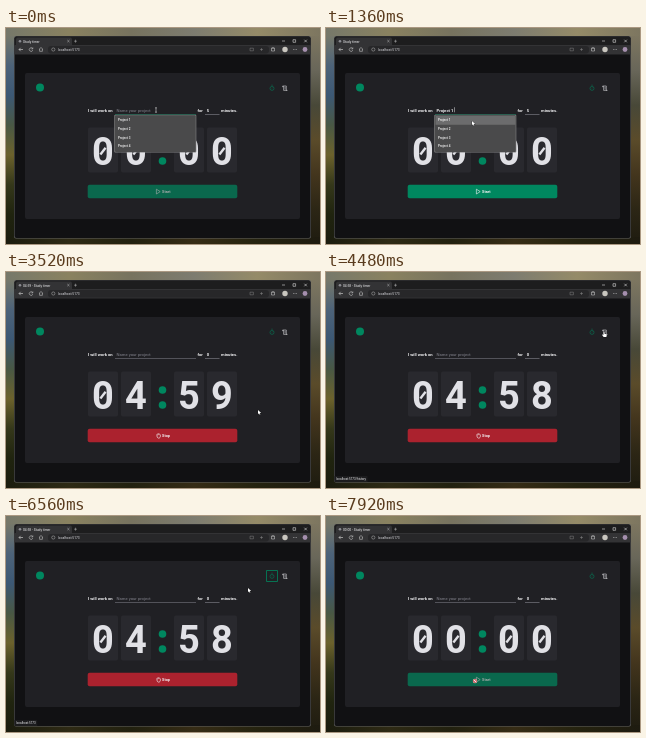
Write an HTML page with a canvas that moves like this. It is 314 px wide and 216 px high and loops after 8000 ms.

```html
<!DOCTYPE html>
<html lang="en">
<head>
<meta charset="utf-8">
<title>Study timer</title>
<style>
  html, body { margin: 0; width: 100%; height: 100%; overflow: hidden; background: #111; }
  canvas { display: block; width: 314px; height: 216px; }
</style>
</head>
<body>
<canvas id="stage"></canvas>
<script>
const W = 314, H = 216, LOOP = 8000;
const canvas = document.getElementById('stage');
const ratio = window.devicePixelRatio || 1;
canvas.width = W * ratio;
canvas.height = H * ratio;
const c = canvas.getContext('2d');
c.scale(ratio, ratio);

const C = {
  page: '#111113', card: '#202024', box: '#29292e', head: '#323238',
  grey: '#85858f', soft: '#d4d4da', text: '#e1e1e6', bright: '#f4f4f6',
  green: '#00875f', greenHover: '#015f43', greenOff: '#0a684d',
  red: '#ab222e', redHover: '#7a1921'
};

// Moments of the interaction, in ms
const T = { pick: 1040, close: 1520, start: 1960, tick: 3040, tick2: 4040,
            history: 4640, back: 6160, tick3: 7200, stop: 7440 };

// Pointer stops: time, x, y
const PATH = [
  [0, 150, 82], [480, 150, 82], [1000, 146, 93], [1520, 146, 93],
  [1880, 169, 166], [2640, 169, 166], [2720, 168.5, 166], [3040, 168.5, 166],
  [3440, 252, 138], [3760, 252, 138], [4400, 278, 60], [5600, 278, 60],
  [6000, 266, 60], [6240, 266, 60], [6560, 242, 72], [6680, 240, 76],
  [7200, 149, 164], [8000, 149, 164]
];

function rect(x, y, w, h, fill, r = 0) {
  c.fillStyle = fill;
  c.beginPath();
  c.roundRect(x, y, w, h, r);
  c.fill();
}
function circle(x, y, r, fill) {
  c.fillStyle = fill;
  c.beginPath();
  c.arc(x, y, r, 0, 7);
  c.fill();
}
function stroke(d, color, width = 0.6) {
  c.strokeStyle = color;
  c.lineWidth = width;
  c.stroke(new Path2D(d));
}
function text(s, x, y, size, color, weight = 400, align = 'left') {
  c.font = `${weight} ${size}px Roboto, sans-serif`;
  c.textAlign = align;
  c.fillStyle = color;
  c.fillText(s, x, y);
}
function gradient(x0, y0, x1, y1, colors) {
  const g = c.createLinearGradient(x0, y0, x1, y1);
  colors.forEach((color, i) => g.addColorStop(i / (colors.length - 1), color));
  return g;
}

function pointerAt(t) {
  const i = Math.max(1, PATH.findIndex(p => p[0] > t));
  const [t0, x0, y0] = PATH[i - 1], [t1, x1, y1] = PATH[i];
  const k = (t - t0) / (t1 - t0), e = k * k * (3 - 2 * k);
  return [x0 + (x1 - x0) * e, y0 + (y1 - y0) * e];
}
function clockAt(t) {
  if (t < T.start || t >= T.stop) return '0000';
  if (t < T.tick) return '0500';
  if (t < T.tick2) return '0459';
  return t < T.tick3 ? '0458' : '0455';
}

function drawWallpaper() {
  rect(0, 0, W, 10, gradient(0, 0, W, 0,
    ['#76786a', '#8a8260', '#77735f', '#7d7c70', '#958b68', '#7d7660']));
  rect(0, 8, 10, H, gradient(0, 8, 0, H,
    ['#76786a', '#4d6379', '#3c5874', '#495844', '#6c622c', '#35381a', '#20240f', '#1b1c0e']));
  rect(303, 8, 11, H, gradient(0, 8, 0, H,
    ['#7d7660', '#686659', '#484838', '#5a4b2a', '#43351d', '#2c2615', '#1e1b10']));
  rect(0, 209, W, 7, gradient(0, 0, W, 0,
    ['#1b1c0e', '#2e2a14', '#22210f', '#362c15', '#25230f', '#1e1b10']));
}

function drawBrowser(title, path) {
  rect(8, 8, 297, 202.5, '#626262', 2);
  rect(8.5, 8.5, 296, 201.5, C.page, 2);
  rect(8.5, 8.5, 296, 9, '#1d1d1e', [2, 2, 0, 0]);
  rect(10, 9.5, 56, 8, '#333335', [2, 2, 0, 0]);
  rect(8.5, 17, 296, 9.5, '#333335');
  rect(42, 18, 221, 7.4, '#272729', 3);

  circle(14, 13.3, 1.3, '#8c8c92');
  text(title, 17, 14.5, 3.3, C.bright);
  const ink = '#d8d8d8';
  stroke('M61.3 12l2.2 2.2m0-2.2l-2.2 2.2M68 13.2h3m-1.5-1.5v3', ink, 0.4);
  stroke('M276 13h3M287 11.7h2.6v2.6H287zM298.3 11.7l2.6 2.6m0-2.6l-2.6 2.6', ink, 0.6);
  stroke('M17 21.5h-4m1.7-1.7l-1.7 1.7 1.7 1.7', ink);
  stroke('M26.6 20.6a1.8 1.8 0 1 0 .2 1.5M26.8 19.4v1.5h-1.5', ink, 0.5);
  stroke('M33 21.4l2-1.9 2 1.9M33.6 21v2.3h2.8V21', ink, 0.5);
  stroke('M45.7 21.5a1.6 1.6 0 1 0 3.2 0a1.6 1.6 0 1 0-3.2 0', ink, 0.4);
  text('localhost:5173' + path, 52, 22.8, 3.3, C.text);
  stroke('M244 20.2h3.4v2.6H244zM254 21.5h3m-1.5-1.5v3', '#9a9a9a', 0.4);
  stroke('M265.5 20h3v3h-3zM267 19v2', ink, 0.5);
  circle(279, 21.5, 2.7, '#c9c6bf');
  [287.5, 289, 290.5].forEach(x => circle(x, 21.5, 0.4, ink));
  circle(299, 21.5, 2.4, '#a58fae');
}

function drawHeader(t, onHistory) {
  rect(19, 45, 275, 146, C.card, 2);
  circle(34, 59.5, 4, C.green);
  const timer = onHistory ? C.text : C.green, list = onHistory ? C.green : C.text;
  stroke('M264 60.4a2 2 0 1 0 4 0a2 2 0 1 0-4 0M266 60.4l.8-.8M265.3 57.2h1.4', timer, 0.5);
  stroke('M276.6 58h3.7v4.4h1.2M276.6 58v1.2M277.6 58v4.4h3.3M278.5 59.7h1.2m-1.2 1.2h1.2', list, 0.55);
  if (onHistory) stroke('M284.5 54v12h-11', C.green, 0.9);
  else if (t >= T.back && t < T.stop) stroke('M260.5 54.5h11v11h-11z', C.green, 0.8);
}

function drawForm(t) {
  const focused = t < T.close, filled = t >= T.pick && t < T.start;
  text('I will work on', 82, 83.5, 4.2, C.bright, 700);
  text(filled ? 'Project 1' : 'Name your project', 110.5, 83.5, 4.2, filled ? C.bright : C.grey, filled ? 700 : 400);
  if (filled && focused) rect(128.3, 79.3, 0.5, 5, C.text);
  rect(109, 86, 81, 0.6, focused ? C.green : C.grey);
  text('for', 191.5, 83.5, 4.2, C.bright, 700);
  text(t < T.start ? '5' : '0', 202, 83.5, 4.2, C.bright, 700, 'center');
  rect(199, 86, 14.5, 0.6, C.grey);
  text('minutes.', 215, 83.5, 4.2, C.bright, 700);
}

function drawClock(digits) {
  [97, 130, 183, 216].forEach((x, i) => {
    rect(x - 15, 99.5, 30, 45, C.box, 2);
    text(digits[i], x, 136.5, 38, C.text, 700, 'center');
    if (digits[i] === '0') stroke(`M${x - 2.6} 126.4L${x + 2.6} 119.8`, C.text, 2.4);
  });
  circle(156.5, 118, 3.8, C.green);
  circle(156.5, 133, 3.8, C.green);
}

function drawButton(t, hover) {
  const running = t >= T.start && t < T.stop;
  const enabled = t >= T.pick && t < T.start;
  const fill = running ? (hover ? C.redHover : C.red)
    : enabled ? (hover ? C.greenHover : C.green) : C.greenOff;
  const ink = running || enabled ? C.bright : '#a6aaaa';
  rect(81.7, 156.7, 149.6, 13.5, fill, 2);
  if (running) stroke('M151 164v-1.9m1.1 1v-2m1.1 2v-1.6m-2.2 2.4c0 3 3.4 3 3.4 0v-1.3', ink, 0.65);
  else stroke('M150.4 161.2v4.8l3.8-2.4z', ink, 0.6);
  text(running ? 'Stop' : 'Start', 156, 165.1, 3.9, ink, 700);
}

function drawSuggestions(t) {
  rect(108.3, 86.7, 82, 37.8, '#808081', 1);
  rect(109, 87.3, 80.7, 36.6, '#4a4a4b', 1);
  if (t >= T.pick) rect(109.5, 88, 80, 8.7, '#6c6c6d');
  for (let i = 0; i < 4; i++) text('Project ' + (i + 1), 112, 93.2 + i * 8.65, 3.1, '#fff', 500);
}

function drawHistory() {
  text('My history', 41.8, 83.8, 5.6, C.bright, 700);
  rect(42, 92.5, 229, 13, C.head, [2, 2, 0, 0]);
  rect(42, 106.3, 229, 12.7, C.box);
  const columns = [47, 160, 188, 238];
  ['Task', 'Duration', 'Begin', 'Status'].forEach((s, i) => text(s, columns[i], 100.3, 3.5, C.bright, 700));
  ['Project 1', '5 minutes', 'less than a minute ago'].forEach((s, i) => text(s, columns[i], 114, 3.25, C.soft, 500));
  circle(239, 113, 1, '#fba94c');
  text('In progress', 242, 114, 3.25, C.soft, 500);
}

function drawStatus(s) {
  c.font = '400 3px Roboto, sans-serif';
  rect(8.5, 204, c.measureText(s).width + 3, 6, '#1c1c1e', [0, 1, 0, 0]);
  text(s, 10, 208, 3, C.bright);
}

function drawPointer(x, y, kind) {
  c.save();
  c.translate(x, y);
  if (kind === 'text') {
    stroke('M-1-2.2h2M0-2.2v4.4M-1 2.2h2', '#eeeeee', 0.5);
  } else if (kind === 'blocked') {
    circle(0, 1, 2.2, '#eeeeee');
    stroke('M-1.7 1a1.7 1.7 0 1 0 3.4 0a1.7 1.7 0 1 0-3.4 0M-1.2 2.2L1.2-.2', '#c43c40', 0.7);
  } else {
    const shape = new Path2D(kind === 'hand'
      ? 'M-.5 0q.5-.6 1 0v1.7l1.8.5q.6.2.5.8l-.4 2H-.4L-1.9 3q0-.8.8-.4l.6.4z'
      : 'M0 0v4.2l1-.9.7 1.5.7-.3-.6-1.5h1.4z');
    c.strokeStyle = '#111';
    c.lineWidth = 0.5;
    c.fillStyle = '#fff';
    c.stroke(shape);
    c.fill(shape);
  }
  c.restore();
}

function draw(t) {
  const onHistory = t >= T.history && t < T.back;
  const digits = clockAt(t);
  const [x, y] = pointerAt(t);
  const overButton = !onHistory && x > 82 && x < 231 && y > 157 && y < 170;
  const overTimer = x > 260 && x < 272 && y > 54 && y < 66;
  const overList = x > 273 && x < 285 && y > 54 && y < 66;
  const overField = x > 109 && x < 190 && y > 78 && y < 87;

  drawWallpaper();
  drawBrowser(t < T.tick ? 'Study timer' : `${digits.slice(0, 2)}:${digits.slice(2)} - Study timer`,
    onHistory ? '/history' : '');
  drawHeader(t, onHistory);
  if (onHistory) {
    drawHistory();
  } else {
    drawForm(t);
    drawClock(digits);
    drawButton(t, overButton);
    if (t < T.close) drawSuggestions(t);
  }
  if (overList) drawStatus('localhost:5173/history');
  else if (overTimer || (t > T.back && t < 6720)) drawStatus('localhost:5173');

  let kind = 'arrow';
  if (overButton) kind = t >= T.stop ? 'blocked' : 'hand';
  else if (overTimer || overList) kind = 'hand';
  else if (overField && !onHistory) kind = 'text';
  drawPointer(x, y, kind);
}

function frame() {
  const t = performance.now() % LOOP;
  draw(Math.floor(t / 80) * 80);
  requestAnimationFrame(frame);
}
frame();
</script>
</body>
</html>
```
